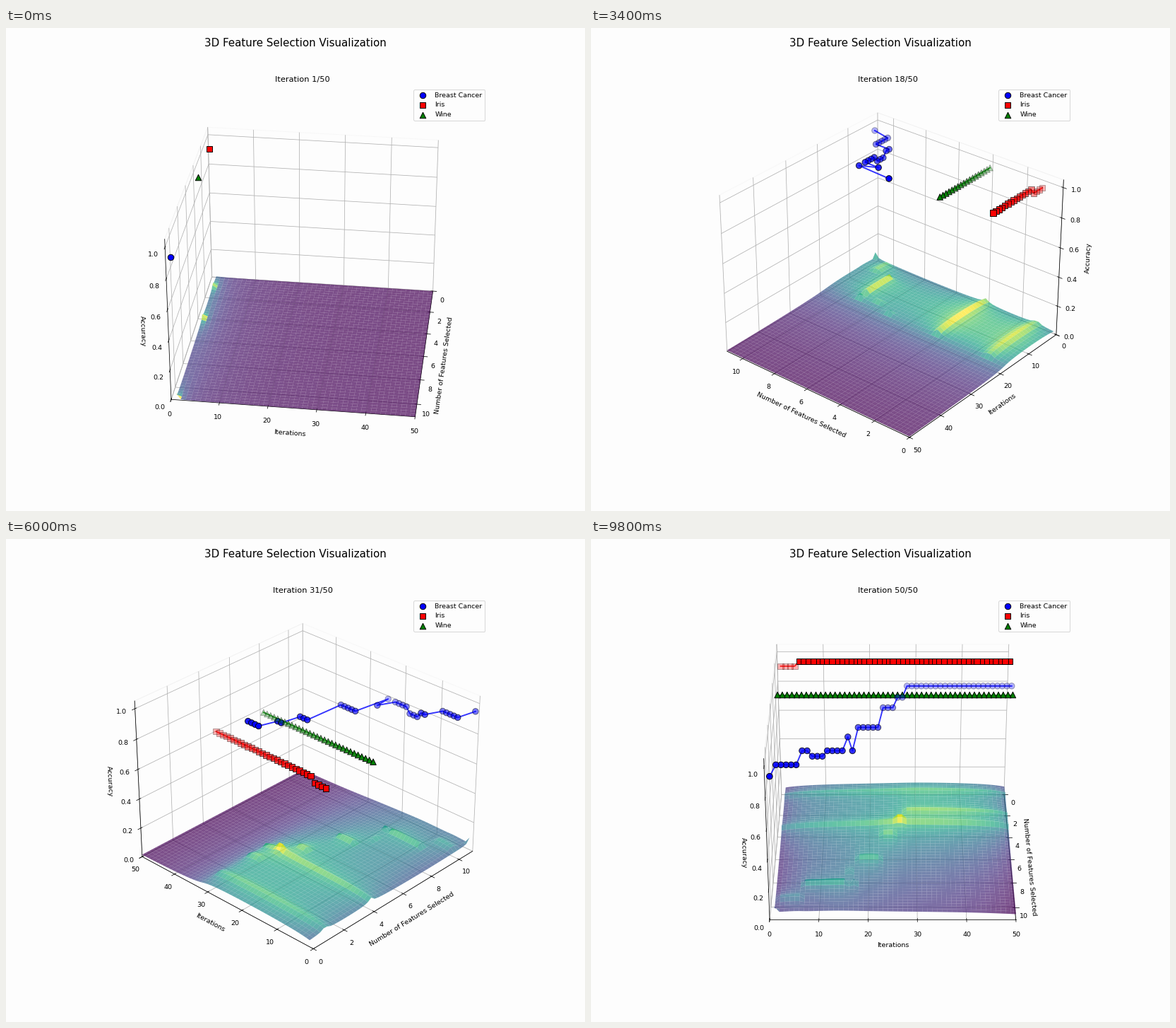
A matplotlib script that plays this animation: 820x683 px, repeating every 10000 ms.

```python
import numpy as np
import matplotlib.pyplot as plt
from matplotlib.animation import FuncAnimation

N = 50
MAX_FEATURES = 11
DPI = 820 / 12
PAPER = "#fdfdfd"


def runs(*parts):
    """Expand (count, features, accuracy) runs into one row per iteration."""
    rows = [(f, acc) for count, f, acc in parts for _ in range(count)]
    return np.array(rows, float)


# name, colour, marker, path of (features, accuracy)
DATASETS = [
    ("Breast Cancer", "blue", "o", runs(
        (1, 11, 107 / 114), (5, 10, 107 / 114), (2, 9, 109 / 114),
        (3, 9, 105 / 114), (4, 9, 109 / 114), (1, 8, 111 / 114),
        (1, 9, 109 / 114), (5, 7, 110 / 114), (3, 5, 109 / 114),
        (2, 4, 109 / 114), (23, 3, 110 / 114))),
    ("Iris", "red", "s", runs((4, 1, 29 / 30), (46, 1, 1.0))),
    ("Wine", "green", "^", runs((50, 4, 35 / 36))),
]

STEPS = np.arange(1, N + 1)
X, Y = np.meshgrid(np.linspace(0, MAX_FEATURES, 50), STEPS)

plt.rcParams.update({"figure.facecolor": PAPER, "axes.facecolor": PAPER})
fig = plt.figure(figsize=(12, (683 + 1e-6) / DPI), dpi=DPI)
fig.suptitle("3D Feature Selection Visualization", fontsize=16)
ax = fig.add_subplot(111, projection="3d")
ax.set_xlim(0, MAX_FEATURES)
ax.set_ylim(0, N)
ax.set_zlim(0, 1.05)
ax.set_xlabel("Number of Features Selected")
ax.set_ylabel("Iterations")
ax.set_zlabel("Accuracy")
for axis in (ax.xaxis, ax.yaxis, ax.zaxis):
    axis.pane.fill = False

drawn = []


def landscape(n):
    """Sum of inverse-distance bumps around every visited point."""
    z = np.zeros_like(X)
    for *_, path in DATASETS:
        for step, (f, acc) in zip(STEPS[:n], path):
            z += acc / (np.hypot(X - f, Y - step) + 0.1)
    return z / 200


def update(i):
    n = i + 1
    while drawn:
        drawn.pop().remove()

    drawn.append(ax.plot_surface(X, Y, landscape(n), cmap="viridis",
                                 alpha=0.7, linewidth=0, antialiased=True))
    for name, color, marker, path in DATASETS:
        f, acc = path[:n].T
        drawn.extend(ax.plot(f, STEPS[:n], acc, color=color,
                             linewidth=2, alpha=0.8))
        drawn.append(ax.scatter(f, STEPS[:n], acc, c=color, marker=marker,
                                s=80, edgecolors="black", linewidths=1,
                                label=name))

    ax.legend(loc="upper right")
    ax.set_title(f"Iteration {n}/{N}")
    ax.view_init(elev=30, azim=n * 360 / N % 360)
    return drawn


ani = FuncAnimation(fig, update, frames=N, interval=200,
                    init_func=lambda: update(0), repeat=True, repeat_delay=0)
plt.show()
```
